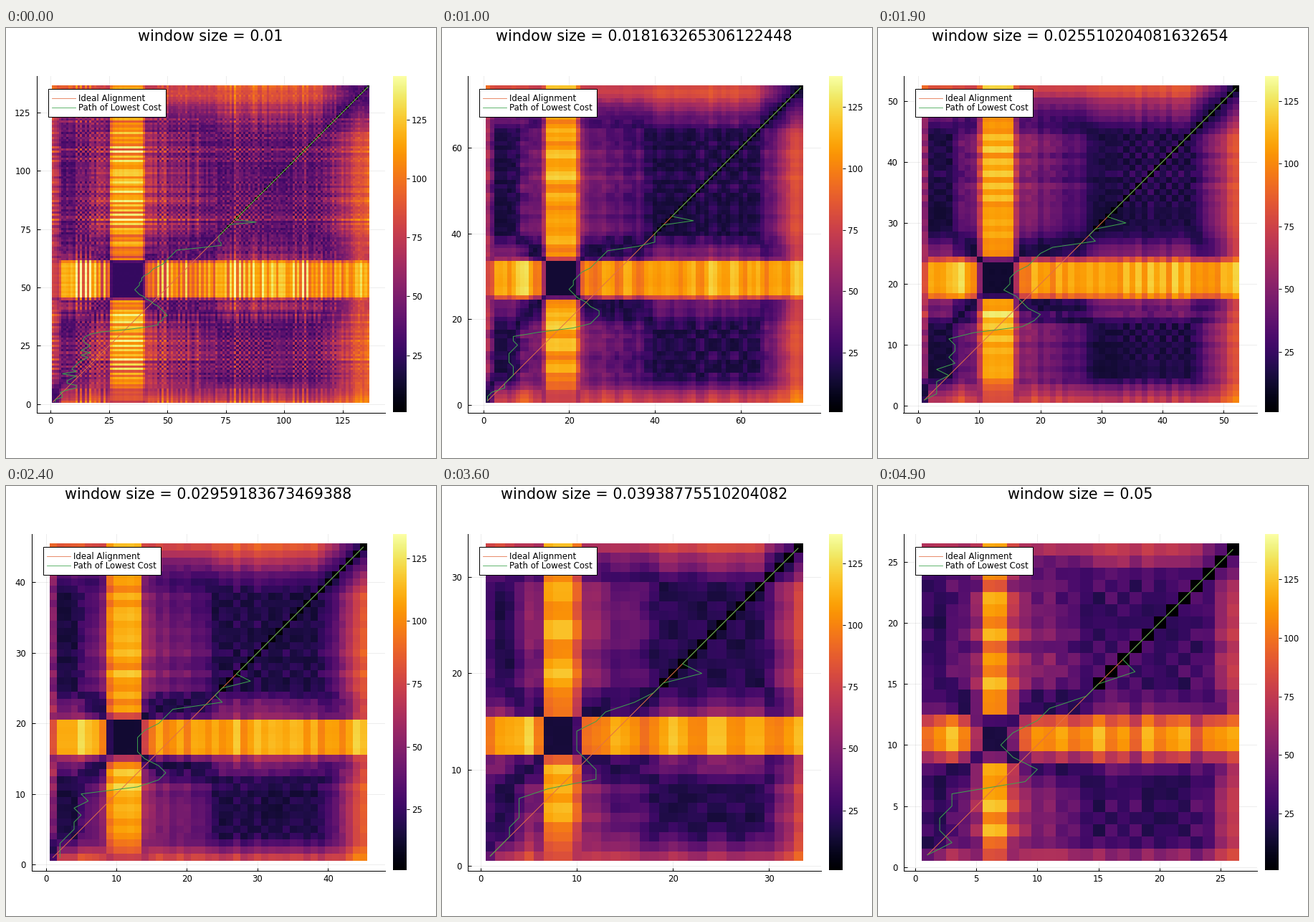
A matplotlib script for the animation above (5 s loop, 600 by 600 pixels).

```python
import math

import matplotlib.pyplot as plt
import numpy as np
from matplotlib.animation import FuncAnimation
from matplotlib.patches import Rectangle

SIZE, DPI = 600, 100
FRAMES, LOOP_MS = 50, 5000
PX = 72 / DPI
DURATION = 1.374
SYNC = .72                       # from here on both recordings coincide
ORANGE, GREEN = "#e36f47", "#3ea44e"
SMALL, LARGE = 11.8 * PX, 20.8 * PX
TOP, BOTTOM, RIGHT = 67, 536.5, 528.5

# Key points (seconds, value) of the first recording
LOUDNESS = [(0, 62), (.02, 65), (.045, 105), (.18, 122), (.25, 88), (.262, 3),
            (.398, 3), (.405, 80), (.48, 105), (1.1, 112), (1.37, 92)]
VOWEL = [(.13, 0), (.17, 35), (.25, 45), (.27, 18), (.39, 18), (.41, 48),
         (.55, 35), (.68, 25), (.74, 0), (1.12, 0), (1.25, 36)]
ONSET = [(0, 55), (.03, 30), (.05, 0)]
ENDING = [(1.14, 0), (1.27, 42), (1.32, 74), (1.37, 66)]

# Time in the second recording -> time of the same sound in the first
WARP = [(0, 0), (.35, .14), (.457, .262), (.612, .4), (SYNC, SYNC), (1.5, 1.5)]
ROUTE = [(0, .01), (.1, .1), (.3, .165), (.335, .45), (.385, .5), (.44, .43),
         (.485, .36), (.55, .4), (.61, .49), (.66, .54), (.68, .73), (SYNC, SYNC), (1.5, 1.5)]


def window_size(step):
    return (49 + 4 * step) / 4900


def curve(knots, t):
    return np.interp(t, *zip(*knots))


def roughness(step):
    """Texture strength: high for the shortest windows, rising again at the end."""
    return 5 + 14 * math.exp(-step / 5) + 6 * (step / FRAMES) ** 2


def features(t, window, warp, noise, rough):
    """Feature vectors at times t, averaged over one window."""
    spread = t[:, None] + window * np.linspace(-.48, .48, 13)
    loud, vowel, onset, ending = (curve(knots, curve(warp, spread)).mean(axis=1)
                                  for knots in (LOUDNESS, VOWEL, ONSET, ENDING))
    voiced = np.clip(loud / 105, .1, 1)
    tone = voiced * rough * np.cos(2 * np.pi * 451.6 * (t - .985))
    grain = .6 * voiced * rough * noise
    return np.stack([loud + tone + grain[0], vowel + grain[1], onset, ending, tone + grain[2]])


def distances(step, count, window):
    t = np.arange(1, count + 1) * window
    rough = roughness(step)
    noise, other = np.random.default_rng(step).uniform(-1.5, 1.5, (2, 3, count))
    x = features(t, window, [(0, 0), (1.5, 1.5)], noise, rough)
    y = features(t, window, WARP, np.where(t > SYNC, noise, other), rough)
    squared = ((y[:, :, None] - x[:, None, :]) ** 2).sum(axis=0)
    lag = (t[:, None] - t) / (.5 * window)
    same = np.exp(-lag ** 2) * (t[:, None] > SYNC)
    return np.sqrt(squared + (6 + rough) ** 2 * (1 - same) + .5)


def lowest_cost_path(step, count, window):
    rows = np.arange(1, count + 1)
    t = rows * window
    wobble = np.random.default_rng(step).normal(0, .025, count) * (t < .32)
    cols = np.round((curve(ROUTE, t) + wobble) / window)
    cols = np.where(t > SYNC, rows, cols)
    last_slip = round(.775 / window)
    cols[last_slip - 1] += max(2, round(.1 / window))
    return np.clip(cols, 1, count), rows


def nice_ticks(low, high):
    """Ticks with the best mix of count, coverage and round numbers."""
    best, best_score = None, -1
    for base, niceness in ((1, 1), (5, .9), (2, .7), (2.5, .5), (3, .2)):
        for scale in (1, 10, 100):
            gap = base * scale
            ticks = np.arange(math.ceil(low / gap), math.floor(high / gap) + 1) * gap
            if not 4 <= len(ticks) <= 8:
                continue
            coverage = 1.5 * (high - low) / (ticks[-1] - ticks[0])
            score = (1 - abs(len(ticks) - 5) / 5) / 4 + coverage / 3 + niceness / 4
            if score > best_score:
                best, best_score = ticks, score
    return best


def pixel_axes(left, top, right, bottom):
    return fig.add_axes([left / SIZE, 1 - bottom / SIZE,
                         (right - left) / SIZE, (bottom - top) / SIZE])


def draw_heatmap(step, count, window, peak):
    low, high = .5 - .03 * count, .5 + 1.03 * count
    ticks = nice_ticks(low, high)
    left = 42.5 if ticks[-1] >= 100 else 35.5
    ax = pixel_axes(left, TOP, RIGHT, BOTTOM)
    ax.imshow(distances(step, count, window), cmap="inferno", vmin=.7, vmax=peak,
              origin="lower", extent=(.5, count + .5, .5, count + .5),
              aspect="auto", interpolation="nearest", zorder=2)
    ax.plot([1, count], [1, count], color=ORANGE, lw=PX, zorder=3)
    ax.plot(*lowest_cost_path(step, count, window), color=GREEN, lw=PX, zorder=4)

    middle = (count + 1) / 2
    half = (high - low) / 2 * (RIGHT - left) / (BOTTOM - TOP)
    ax.set_xlim(middle - half, middle + half)
    ax.set_ylim(low, high)
    labels = [f"{v:g}" for v in ticks]
    ax.set_xticks(ticks, labels)
    ax.set_yticks(ticks, labels)
    ax.tick_params(direction="in", length=4.5 * PX, width=PX, labelsize=SMALL)
    ax.tick_params(axis="x", pad=5.5 * PX)
    ax.tick_params(axis="y", pad=8 * PX)
    ax.set_axisbelow(True)
    ax.grid(color="black", alpha=.07, lw=PX)
    ax.spines[["top", "right"]].set_visible(False)
    ax.spines[["left", "bottom"]].set_linewidth(PX)
    return left


def draw_colorbar(peak):
    ax = pixel_axes(540, TOP, 558.5, BOTTOM)
    ax.imshow(np.linspace(0, 1, 256)[:, None], cmap="inferno", origin="lower",
              extent=(0, 1, .7, peak), aspect="auto")
    ax.set_xticks([])
    ax.yaxis.tick_right()
    ax.set_yticks(range(25, 126, 25))
    ax.tick_params(axis="y", length=4 * PX, width=PX, pad=3.5 * PX, labelsize=SMALL)
    ax.spines[:].set_visible(False)


def draw_overlay(window, left):
    ax = pixel_axes(0, 0, SIZE, SIZE)
    ax.set(xlim=(0, SIZE), ylim=(SIZE, 0))
    ax.axis("off")
    ax.text((left + RIGHT) / 2, 18.5, f"window size = {window!r}", fontsize=LARGE,
            ha="center", va="baseline")
    box = left + 16
    ax.add_patch(Rectangle((box, 84.5), 164, 39, fc="white", ec="black", lw=PX))
    entries = (("Ideal Alignment", ORANGE, 98), ("Path of Lowest Cost", GREEN, 111))
    for label, color, y in entries:
        ax.plot([box + 5.5, box + 38.5], [y - .5, y - .5], color=color, lw=.8 * PX)
        ax.text(box + 42.5, y + 4, label, fontsize=SMALL, va="baseline")


def draw(step):
    fig.clf()
    window = window_size(step)
    count = math.floor(DURATION / window) - 1
    peak = 134.6 + 9.7 * ((step - 24) / 25) ** 2
    left = draw_heatmap(step, count, window, peak)
    draw_colorbar(peak)
    draw_overlay(window, left)
    return []


plt.rcParams["font.family"] = "DejaVu Sans"
fig = plt.figure(figsize=(SIZE / DPI, SIZE / DPI), dpi=DPI, facecolor="white")
animation = FuncAnimation(fig, draw, frames=FRAMES, init_func=lambda: [],
                          interval=LOOP_MS / FRAMES, repeat=True, repeat_delay=0)
plt.show()
```
